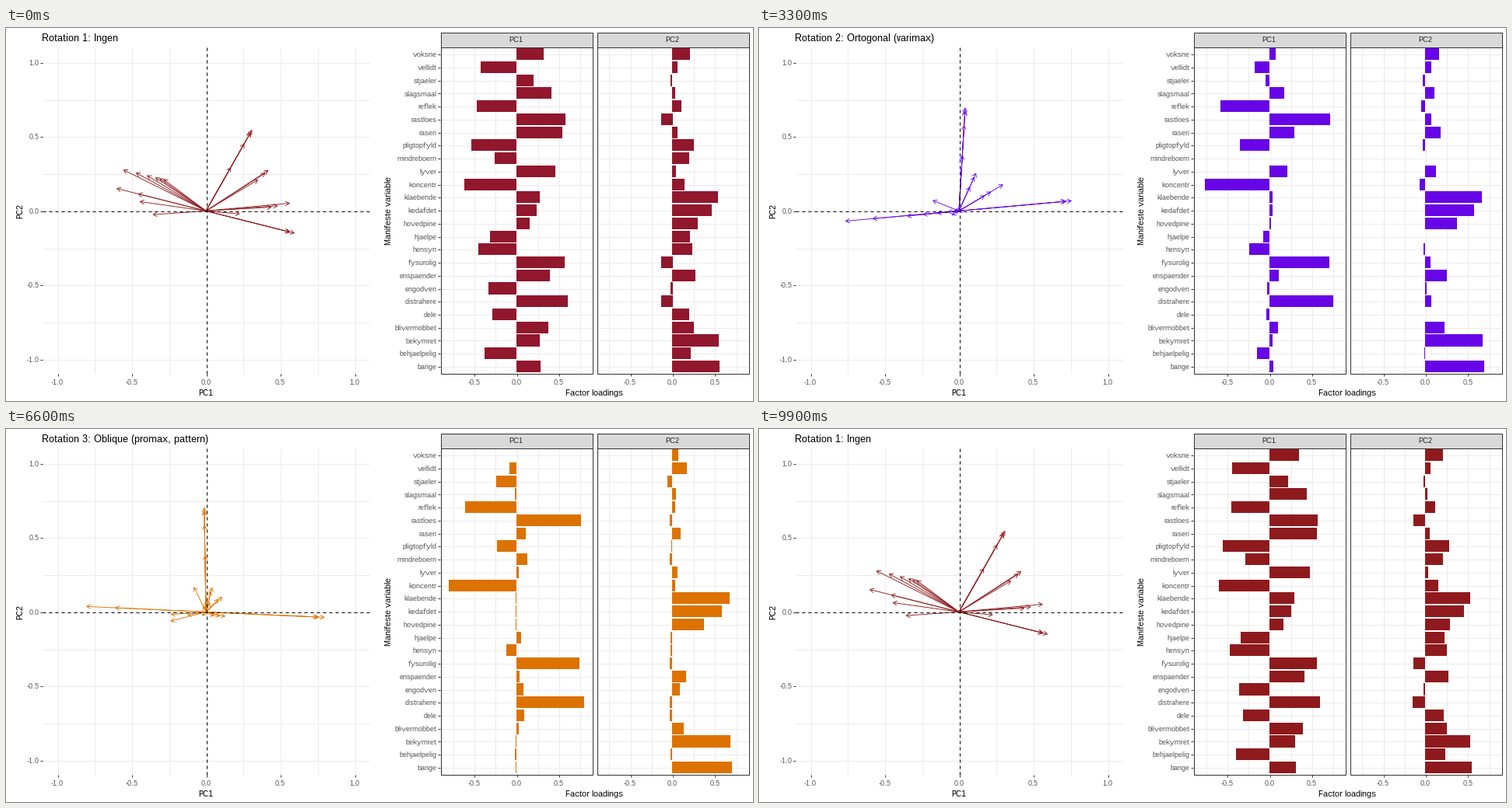
Recreate the animation shown at these times as a matplotlib script. Size 960 by 480 pixels, loop 10000 ms.

```python
import numpy as np
import matplotlib as mpl
import matplotlib.pyplot as plt
from matplotlib.animation import FuncAnimation
from matplotlib.collections import LineCollection, PolyCollection
from matplotlib.patches import Rectangle

mpl.rcParams.update({
    "font.family": "Liberation Sans",
    "text.hinting": "default",
    "text.hinting_factor": 1,
    "toolbar": "None",
})

W, H, DPI = 960, 480, 100
PX = 72 / DPI                      # points per pixel
HOLD, STEPS = 21, 12               # still frames before a move, steps in a move
GRID, DARK, GREY = "#EBEBEB", "#333333", "#4D4D4D"

NAMES = ("voksne vellidt stjaeler slagsmaal reflek rastloes raseri pligtopfyld "
         "mindreboern lyver koncentr klaebende kedafdet hovedpine hjaelpe hensyn "
         "fysurolig enspaender engodven distrahere dele blivermobbet bekymret "
         "behjaelpelig bange").split()
TITLES = ["Rotation 1: Ingen",
          "Rotation 2: Ortogonal (varimax)",
          "Rotation 3: Oblique (promax, pattern)"]
COLOURS = ["#8F1A1D", "#6705E6", "#DC7200"]

# Left panel: origin and unit; right panels: left edges, zeros, unit, rows
X0, Y0, UNIT = 257, 235.4, 191
LEFT, RIGHT, TOP, BOTTOM = 47, 467, 25, 445
FACETS, FACET_W, BAR_UNIT = (558, 759), 195, 108.9
ZEROS = (656, 856.5)
ROW = 16.74
ROWS = 33.7 + ROW * np.arange(len(NAMES))

# A trait has a direction in the varimax plane and a pull towards the other
# two rotations; each variable only has a strength along its trait.
NO_PULL = np.zeros(2)
UNROTATE = np.array([[.75, -.27], [.40, .80]])
OBLIQUE = np.array([[1.06, -.14], [-.08, 1.02]])
loads = np.zeros((3, len(NAMES), 2))


def trait(direction, pull_none=NO_PULL, pull_oblique=NO_PULL, **strengths):
    for name, s in strengths.items():
        v = s * np.array(direction)
        loads[:, NAMES.index(name)] = (v @ UNROTATE + pull_none, v,
                                       v @ OBLIQUE + pull_oblique)


trait((1, .09), rastloes=.72, fysurolig=.71, distrahere=.755, koncentr=-.762, reflek=-.578)
trait((.06, 1), bekymret=.676, bange=.693, klaebende=.668, kedafdet=.575, hovedpine=.372)
trait((.45, 1), (.23, .10), (-.06, -.08), voksne=.16, blivermobbet=.227, enspaender=.253)
trait((1, .6), (.27, -.01), (-.19, -.04), raseri=.294, lyver=.213, slagsmaal=.17, stjaeler=-.046)
trait((1, .1), (-.28, .21), (.13, -.03), pligtopfyld=-.346, hensyn=-.239, behjaelpelig=-.145,
      hjaelpe=-.073, dele=-.037, mindreboern=-.003)
trait((1, -.4), (-.34, -.04), (.11, .07), vellidt=-.174, engodven=-.026)

TO_XYZ = np.array([[.4124, .3576, .1805], [.2126, .7152, .0722], [.0193, .1192, .9505]])
WHITE = TO_XYZ.sum(axis=1)
TO_LAB = np.array([[0, 116, 0], [500, -500, 0], [0, 200, -200]])


def to_lab(colour):
    c = np.array(mpl.colors.to_rgb(colour))
    lin = np.where(c > .04045, ((c + .055) / 1.055) ** 2.4, c / 12.92)
    v = TO_XYZ @ lin / WHITE
    f = np.where(v > .008856, np.cbrt(v), 7.787 * v + 16 / 116)
    return TO_LAB @ f - (16, 0, 0)


def to_rgb(lab):
    f = np.linalg.solve(TO_LAB, lab + (16, 0, 0))
    v = np.where(f > .2069, f ** 3, (f - 16 / 116) / 7.787) * WHITE
    lin = np.clip(np.linalg.solve(TO_XYZ, v), 0, 1)
    return np.clip(np.where(lin > .0031308, 1.055 * lin ** (1 / 2.4) - .055, 12.92 * lin), 0, 1)


LABS = [to_lab(c) for c in COLOURS]

fig = plt.figure(figsize=(W / DPI, H / DPI), dpi=DPI, facecolor="white")
ax = fig.add_axes([0, 0, 1, 1])
ax.set(xlim=(0, W), ylim=(H, 0))
ax.axis("off")


def mid(v):
    return np.floor(v) + 0.5


def lines(segments, colour, z, width=1):
    return ax.add_collection(LineCollection(
        segments, colors=colour, linewidths=width * PX, zorder=z), autolim=False)


def vline(x, y0, y1):
    return [(mid(x), y0), (mid(x), y1)]


def hline(y, x0, x1):
    return [(x0, mid(y)), (x1, mid(y))]


def label(x, y, s, size, colour="black", ha="center", va="baseline", **kw):
    return ax.text(x, y, s, size=size * PX, color=colour, ha=ha, va=va, zorder=8, **kw)


def draw_left():
    grid = []
    for v in np.linspace(-1, 1, 9):
        grid += [vline(X0 + v * UNIT, TOP, BOTTOM), hline(Y0 - v * UNIT, LEFT, RIGHT)]
    lines(grid, GRID, 1)
    ticks = []
    for v in np.linspace(-1, 1, 5):
        x, y = X0 + v * UNIT, Y0 - v * UNIT
        ticks += [vline(x, BOTTOM, BOTTOM + 3), hline(y, LEFT - 3, LEFT)]
        label(x, 459, f"{v:.1f}", 9, GREY)
        label(42.5, y + 3.5, f"{v:.1f}", 9, GREY, ha="right")
    lines(ticks, DARK, 2)
    for seg in (vline(X0, BOTTOM, TOP), hline(Y0, LEFT, RIGHT)):
        ax.plot(*zip(*seg), color="black", lw=PX, dashes=(4, 4),
                dash_capstyle="butt", zorder=5)
    label(X0, 473, "PC1", 11)
    label(18, Y0, "PC2", 11, va="center", rotation=90)


def draw_right():
    grid, ticks = [], []
    for k, (left, zero) in enumerate(zip(FACETS, ZEROS)):
        for v in np.linspace(-.75, .75, 7):
            grid.append(vline(zero + v * BAR_UNIT, 24, BOTTOM))
        grid += [hline(y, left, left + FACET_W) for y in ROWS]
        for v in (-.5, 0, .5):
            x = zero + v * BAR_UNIT
            ticks.append(vline(x, BOTTOM, BOTTOM + 3))
            label(x, 459, f"{v:.1f}", 9, GREY)
        for top, bottom, fill in ((5, 24, "#D9D9D9"), (24, 444, "none")):
            ax.add_patch(Rectangle((left + .5, top + .5), FACET_W, bottom - top, fc=fill,
                                   ec=DARK, lw=PX, zorder=6))
        label(left + FACET_W / 2 - .5, 18.5, f"PC{k + 1}", 9, "#1A1A1A")
    for name, y in zip(NAMES, ROWS):
        ticks.append(hline(y, FACETS[0] - 3, FACETS[0]))
        label(553.5, y + 3.6, name, 9, GREY, ha="right")
    lines(grid, GRID, 1)
    lines(ticks, DARK, 2)
    label(756, 473, "Factor loadings", 11)
    label(492, Y0, "Manifeste variable", 11, va="center", rotation=90)


def arrow_lines(points):
    """Shafts from the origin with open heads of 30 degrees."""
    tips = np.column_stack([X0 + points[:, 0] * UNIT, Y0 - points[:, 1] * UNIT])
    segs = [[(X0, Y0), tip] for tip in tips]
    for x, y in tips:
        a = np.arctan2(y - Y0, x - X0)
        barbs = [(x - 5.7 * np.cos(a + d), y - 5.7 * np.sin(a + d))
                 for d in (-np.pi / 6, np.pi / 6)]
        segs.append([barbs[0], (x, y), barbs[1]])
    return segs


def bar_boxes(low, high):
    boxes = []
    for k, zero in enumerate(ZEROS):
        for y, a, b in zip(ROWS, low[:, k], high[:, k]):
            x0, x1 = np.round(zero + np.array([a, b]) * BAR_UNIT)
            y0, y1 = np.round([y - .45 * ROW, y + .45 * ROW])
            boxes.append([(x0, y0), (x1, y0), (x1, y1), (x0, y1)])
    return boxes


def mix(values, a, b, t):
    return values[a] * (1 - t) + values[b] * t


draw_left()
draw_right()
title = label(46, 17, "", 13, ha="left")
arrows = lines([], "black", 4, width=0.9)
bars = ax.add_collection(PolyCollection([], linewidths=0, antialiaseds=[False], zorder=3),
                         autolim=False)
LOW, HIGH = np.minimum(loads, 0), np.maximum(loads, 0)


def update(i):
    seg, j = divmod(i, HOLD + STEPS)
    a, b = seg % 3, (seg + 1) % 3
    t = max(0, j - HOLD) / STEPS
    # the bars rest one step ahead of the arrows during the first pause
    bar_t = max(t, 1 / STEPS) if seg == 0 else t
    title.set_text(TITLES[b if t > .5 else a])
    arrows.set_segments(arrow_lines(mix(loads, a, b, t)))
    arrows.set_color([to_rgb(mix(LABS, a, b, t))])
    bars.set_verts(bar_boxes(mix(LOW, a, b, bar_t), mix(HIGH, a, b, bar_t)))
    bars.set_facecolor([to_rgb(mix(LABS, a, b, bar_t))])
    return title, arrows, bars


anim = FuncAnimation(fig, update, frames=100, interval=100, repeat=True,
                     repeat_delay=0, init_func=lambda: update(0), blit=False)
plt.show()
```
